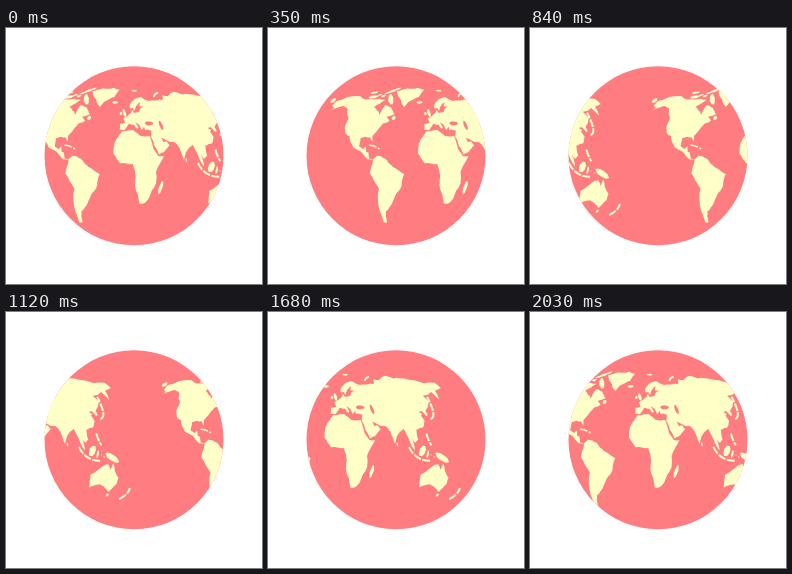
Recreate the animation shown at these times as an HTML page with a canvas. Size 256 px wide and 256 px high, loop 2100 ms.

```html
<!DOCTYPE html>
<html lang="en">
<head>
<meta charset="utf-8">
<title>Turning globe</title>
<style>
html, body { margin: 0; width: 100%; height: 100%; overflow: hidden; background: #fff; }
canvas { display: block; width: 256px; height: 256px; }
</style>
</head>
<body>
<canvas id="c" width="256" height="256"></canvas>
<script>
const ctx = document.getElementById('c').getContext('2d');
const SEA = '#ff7c80', LAND = '#ffffc8';
const STEP = 70, STEPS = 30, SPAN = 255, ROUGH = 0.14;

// Key capes and bays as longitude, latitude; the coast between them is grown by rule
const northAmerica = [
  -168,66, -157,71, -128,70, -95,69, -82,68, -94,60, -82,55, -79,52, -77,62, -65,59.5,
  -56,52.5, -67,50, -61,46, -70,43, -76,36, -81,31, -80,25.5, -84,30, -97,29, -97,21,
  -91,18.5, -88,21, -87,16, -83.5,15, -82,9, -77,8.5, -84,8.5, -94,16, -105,20, -113,31,
  -120,34, -124,40, -124,48, -135,58, -148,61, -163,55, -158,59, -165,61];
const southAmerica = [
  -77,8.5, -72,12, -60,9, -50,1, -35,-6, -39,-17, -48,-26, -57,-37, -65,-42, -68,-53,
  -73,-53, -74,-42, -70,-20, -81,-5, -77.5,4];
const africa = [
  -6,35.5, 10,37, 20,31, 33,31, 37,19, 43,12, 51,11.5, 40,-4, 40.5,-15, 35,-22, 32,-29,
  26,-34, 19,-34.5, 12,-17, 13,-8, 9,4, -8,4.5, -17,14, -16,24, -10,31];
const europe = [
  -9,37, -9,43, -1,44, -4,48.5, 8,54, 10,57, 12,54, 21,55, 24,59, 30,60, 22,61, 25,65.5,
  17,61, 14,56, 11,59, 6,59, 6,62, 15,68.5, 27,71, 41,67, 35,66, 44,67, 62,68.5, 75,50,
  60,25.5, 56,27, 49,30, 51.5,25, 56,26, 59.5,22, 52,16, 44,13, 39,21, 34.5,30, 36,36.5,
  27,37, 26,40.5, 22.5,37, 19.5,42, 13,45.5, 18,40, 16,38, 12,42, 4,43, -2,37];
const asia = [
  55,45, 60,68, 68,68.5, 71,73, 80,72, 104,77.5, 113,74, 140,72.5, 180,69, 178,63, 163,60,
  157,51, 155,59, 136,55, 140,49, 128,40, 129,36, 126,35, 122,40, 118,39, 122,37, 119,35,
  122,30, 117,23.5, 108,21.5, 109,12, 105,9, 100.5,13, 104,1.5, 98,9, 94,17, 91,22.5,
  80.5,15, 77.5,8, 72.5,20, 67,25, 60,25.5];
const australia = [
  114,-22, 116,-34.5, 131,-31.5, 139,-35, 146,-39, 153,-31, 153,-25, 146,-18.5, 142.5,-11,
  140,-17.5, 136,-12, 130,-13, 122,-18];
const greenland = [-72,78, -55,82.5, -30,83.5, -14,81, -22,71, -38,66, -44,60, -53,67];

// Islands: longitude, latitude, length, breadth, tilt
const isles = [
  [-73,68.5,20,6,-35], [-109,71,16,4,0], [-80,79.5,22,5,20], [-175,67,11,4,-20],
  [-56,48.8,6,4,0], [-19,65,10,3,0], [-2.5,54,9,4.5,120], [-8,53.3,4,3.5,0],
  [18,79,12,2.5,0], [47,-19,14,4.5,70], [114,1,12,8,50], [121,-2,8,2.5,75],
  [140.5,-5.5,21,6,-25], [146.5,-42,4,3,0], [80.8,7.5,4,2,90]];
const inlandSeas = [[34,43.5,13,4,0], [51,41.5,10,4.5,110]];

// Island chains: line width, then start, bend and end
const chains = [
  [2, 131,32, 142,34, 142,54],
  [2, 96,5, 105,-9, 126,-8.5],
  [2, 121,18, 122,12, 126,6.5],
  [1.4, -84,22, -78,22.5, -69,18.5],
  [2, 167.5,-46, 177,-41, 174,-35],
  [1.8, 53,71, 57,75, 67,76.6]];

let seed = 7;
function rand() {
  seed = (seed * 16807) % 2147483647;
  return seed / 2147483647;
}

function project([lon, lat]) {
  const q = lat * lat, a = Math.abs(lat);
  const narrow = 1 - 4.4e-5 * q - 3e-9 * q * q;
  const rise = Math.sign(lat) * (0.0124 * a - 2e-13 * a ** 6);
  return [120 + 0.75 * lon * narrow, 140 - 83 * rise];
}

const pairs = flat => flat.flatMap((v, i) => i % 2 ? [] : [[v, flat[i + 1]]]);

// Splits every edge at a midpoint pushed sideways
function roughen(pts) {
  return pts.flatMap(([x, y], i) => {
    const [u, v] = pts[(i + 1) % pts.length];
    const push = (rand() - 0.5) * ROUGH;
    return [[x, y], [(x + u) / 2 + (y - v) * push, (y + v) / 2 + (u - x) * push]];
  });
}

function coast(pts) {
  const path = new Path2D();
  roughen(roughen(pts)).forEach(p => path.lineTo(...project(p)));
  path.closePath();
  return path;
}

function isle([lon, lat, length, breadth, tilt]) {
  const t = tilt * Math.PI / 180, c = Math.cos(t), s = Math.sin(t);
  const ring = Array.from({ length: 8 }, (_, i) => {
    const a = i * Math.PI / 4;
    const x = Math.cos(a) * length / 2, y = Math.sin(a) * breadth / 2;
    return [lon + x * c - y * s, lat + x * s + y * c];
  });
  return coast(ring);
}

function scatter(count, west, east, south, north, size) {
  return Array.from({ length: count }, () => isle([
    west + rand() * (east - west), south + rand() * (north - south),
    size * (0.6 + rand()), size * 0.4, rand() * 60 - 30]));
}

function chain([width, ...flat]) {
  const [a, b, c] = pairs(flat).map(project);
  const path = new Path2D();
  path.moveTo(...a);
  path.quadraticCurveTo(...b, ...c);
  return { width, path };
}

const land = [
  ...[northAmerica, southAmerica, africa, europe, asia, australia, greenland]
    .map(flat => coast(pairs(flat))),
  ...isles.map(isle),
  ...scatter(6, -120, -88, 72, 77, 7),
  ...scatter(6, 118, 130, -9, 1, 2)];
const water = inlandSeas.map(isle);
const arcs = chains.map(chain);

function drawMap(x) {
  ctx.save();
  ctx.translate(x, 0);
  ctx.fillStyle = ctx.strokeStyle = LAND;
  land.forEach(p => ctx.fill(p));
  ctx.setLineDash([8, 1.5]);
  for (const { width, path } of arcs) {
    ctx.lineWidth = width;
    ctx.stroke(path);
  }
  ctx.fillStyle = SEA;
  water.forEach(p => ctx.fill(p));
  ctx.restore();
}

function draw(now) {
  const shift = Math.floor(now / STEP) % STEPS * SPAN / STEPS;
  ctx.fillStyle = '#fff';
  ctx.fillRect(0, 0, 256, 256);
  ctx.save();
  ctx.beginPath();
  ctx.arc(128, 127.8, 89.5, 0, Math.PI * 2);
  ctx.fillStyle = SEA;
  ctx.fill();
  ctx.clip();
  for (let i = -2; i < 2; i++) drawMap(shift + i * SPAN);
  ctx.restore();
}

const start = performance.now();
function tick() {
  draw(performance.now() - start);
  requestAnimationFrame(tick);
}
tick();
</script>
</body>
</html>
```
